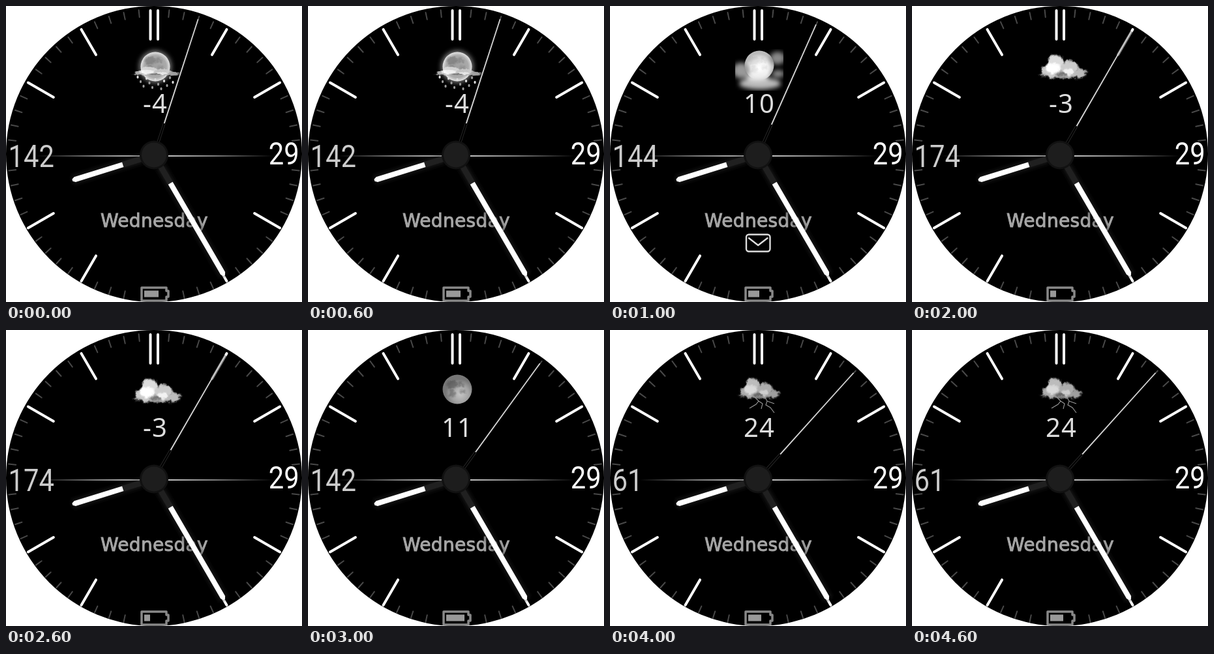
These frames come from a looping animation (454x454 px, 5000 ms). An HTML page:

```html
<!DOCTYPE html>
<html lang="en">
<head>
<meta charset="utf-8">
<title>Watch face</title>
<style>
  html, body { margin: 0; width: 100%; height: 100%; overflow: hidden; background: #fff; }
  svg { display: block; width: 100vw; height: 100vh; }
  .narrow { font: 48px Roboto, "Liberation Sans", sans-serif; transform: scaleX(.87); }
  .temp { font: 500 40px "Noto Sans", "Open Sans", sans-serif; letter-spacing: 1px; }
  .day { font: 28px "DejaVu Sans", sans-serif; letter-spacing: .3px; fill: #a6a6a6; stroke: #a6a6a6; stroke-width: 1; }
</style>
</head>
<body>
<svg viewBox="0 0 454 454">
  <defs>
    <linearGradient id="horizon" gradientUnits="userSpaceOnUse" x1="45" x2="410" y1="0" y2="0">
      <stop offset="0" stop-color="#fff" stop-opacity="0"/>
      <stop offset=".25" stop-color="#fff" stop-opacity=".5"/>
      <stop offset=".5" stop-color="#fff" stop-opacity=".85"/>
      <stop offset=".75" stop-color="#fff" stop-opacity=".5"/>
      <stop offset="1" stop-color="#fff" stop-opacity="0"/>
    </linearGradient>
    <radialGradient id="brightMoon" cx=".5" cy=".6">
      <stop offset="0" stop-color="#fff"/>
      <stop offset=".6" stop-color="#f0f0f0"/>
      <stop offset="1" stop-color="#bbb"/>
    </radialGradient>
    <radialGradient id="rimMoon">
      <stop offset="0" stop-color="#a0a0a0"/>
      <stop offset=".75" stop-color="#aaa"/>
      <stop offset="1" stop-color="#e4e4e4"/>
    </radialGradient>
    <radialGradient id="greyMoon" cx=".6" cy=".65">
      <stop offset="0" stop-color="#c8c8c8"/>
      <stop offset=".6" stop-color="#a2a2a2"/>
      <stop offset="1" stop-color="#777"/>
    </radialGradient>
    <filter id="soft" x="-50%" y="-50%" width="200%" height="200%"><feGaussianBlur stdDeviation="3.5"/></filter>
    <filter id="halo" filterUnits="userSpaceOnUse" x="-20" y="-235" width="40" height="235">
      <feGaussianBlur stdDeviation="3"/>
    </filter>
    <filter id="fluff" x="-20%" y="-20%" width="140%" height="140%">
      <feTurbulence type="fractalNoise" baseFrequency=".12" numOctaves="3" seed="4" result="noise"/>
      <feGaussianBlur in="SourceGraphic" stdDeviation="1"/>
      <feDisplacementMap in2="noise" scale="9" xChannelSelector="R" yChannelSelector="G"/>
    </filter>
    <clipPath id="sky"><rect x="192" y="66" width="74" height="64"/></clipPath>
    <clipPath id="dial"><circle cx="227" cy="227" r="227"/></clipPath>
  </defs>

  <g clip-path="url(#dial)">
    <rect width="454" height="454" fill="#000"/>
    <g id="marks" transform="translate(227 229)" stroke-linecap="round"></g>
    <rect x="45" y="229" width="365" height="2" fill="url(#horizon)"/>

    <g id="weather"></g>
    <text id="temp" class="temp" x="229" y="164" text-anchor="middle" fill="#ddd"></text>
    <text id="count" class="narrow" x="4" y="247" fill="#ccc"></text>
    <text class="narrow" x="463" y="243" fill="#fff">29</text>
    <text class="day" x="145" y="339">Wednesday</text>

    <g id="mail" fill="none" stroke="#ddd" stroke-width="2.4" stroke-linejoin="round" stroke-linecap="round">
      <rect x="209" y="350.5" width="36.5" height="26" rx="4"/>
      <path d="M213 356L227.2 367L241.5 356"/>
    </g>
    <path d="M208 432H246V437H249V446H246V452H208Z" fill="#000" stroke="#888" stroke-width="3.5" stroke-linejoin="round"/>
    <rect id="charge" x="212" y="436.5" height="10" fill="#999"/>

    <g transform="translate(227 228.5)">
      <g id="hands"></g>
      <g id="second">
        <path d="M0 0V-219" stroke="#000" stroke-opacity=".55" stroke-width="4.5"/>
        <path d="M-1.8 0L-1.5 -51M1.8 0L1.5 -51" stroke="#262626"/>
        <path d="M-1 -51H1L.9 -219H-.9Z" fill="#d4d4d4"/>
      </g>
      <circle r="22" fill="#111"/>
      <circle r="19" fill="#1d1d1d"/>
    </g>
  </g>
</svg>

<script>
const $ = id => document.getElementById(id);

const states = [
  { temp: '-4', count: 142, charge: 22, sky: 'sleet' },
  { temp: '10', count: 144, charge: 17, sky: 'mist', mail: true },
  { temp: '-3', count: 174, charge: 9, sky: 'cloud' },
  { temp: '11', count: 142, charge: 28, sky: 'moon' },
  { temp: '24', count: 61, charge: 20, sky: 'storm' }
];

const ellipse = (x, y, rx, ry, fill, extra = '') =>
  `<ellipse cx="${x}" cy="${y}" rx="${rx}" ry="${ry}" fill="${fill}" ${extra}/>`;
const moon = (fill, y = 91) => ellipse(229, y, 22.5, 22.5, `url(#${fill})`);
const soft = content => `<g filter="url(#soft)">${content}</g>`;
const craters = opacity => `<g filter="url(#fluff)" opacity="${opacity}">` +
  ellipse(221, 84, 8, 6, '#555') + ellipse(234, 82, 5, 4, '#666') +
  ellipse(221, 97, 5, 6, '#666') + ellipse(237, 94, 5, 3, '#777') + '</g>';
const cloud = (transform, opacity = 1) =>
  `<g transform="${transform}" opacity="${opacity}"><g filter="url(#fluff)">` +
  ellipse(230, 102, 36, 6, '#aaa') + ellipse(210, 96, 14, 10, '#ccc') +
  ellipse(218, 84, 12, 12, '#ddd') + ellipse(239, 92, 14, 11, '#ccc') +
  ellipse(254, 101, 12, 6, '#bbb') + ellipse(215, 92, 11, 8, '#fff') +
  ellipse(238, 98, 9, 5, '#f2f2f2') + ellipse(228, 102, 8, 3, '#777') + '</g></g>';

function drops() {
  let out = '';
  for (let i = 0; i < 13; i++) {
    out += ellipse(202 + i * 4.5, 109 + (i * 7) % 19, 1.6, 2.3, i % 3 ? '#999' : '#ddd');
  }
  return out;
}

const skies = {
  sleet: soft(ellipse(229, 93, 25, 25, '#777')) + moon('rimMoon', 93) + craters(.4) +
    cloud('translate(1 66) scale(1 .38)', .85) + drops(),
  mist: '<g clip-path="url(#sky)">' + moon('brightMoon') + craters(.12) +
    soft(ellipse(201, 99, 13, 12, '#999') + ellipse(230, 119, 32, 9, '#bbb') +
      ellipse(257, 80, 12, 10, '#888') + ellipse(258, 104, 10, 6, '#888') +
      ellipse(226, 109, 17, 5, '#eee')) + '</g>',
  cloud: cloud('translate(2 3)'),
  moon: moon('greyMoon') + craters(.65),
  storm: cloud('translate(29 11) scale(.87)', .85) +
    '<path d="M222 103L228 109L224 114L214 120M228 109L234 113L232 121M237 102L241 109L239 115L246 119L252 127M241 109L252 113" ' +
    'fill="none" stroke="#999" stroke-width="1.1"/>'
};

function drawMarks() {
  const line = (x, from, to, angle, color, width) =>
    `<path d="M${x} ${-from}V${-to}" stroke="${color}" stroke-width="${width}" transform="rotate(${angle})"/>`;
  let out = line(-5.5, 178, 222, 0, '#fff', 4) + line(6, 178, 222, 0, '#fff', 4);
  for (let i = 1; i < 60; i++) {
    if ([15, 29, 30, 31, 45].includes(i)) continue;
    out += i % 5 ? line(0, 213, 224, i * 6, '#484848', 2) : line(0, 178, 223, i * 6, '#fff', 4);
  }
  $('marks').innerHTML = out;
}

const hand = (angle, length) => `<g transform="rotate(${angle})">
  <path d="M0 -20V${-length}" stroke="#222" stroke-width="14" opacity=".65" filter="url(#halo)"/>
  <path d="M0 0V-50" stroke="#202020" stroke-width="9"/>
  <path d="M-4 -50H4V${4 - length}L1.5 ${-length}H-1.5L-4 ${4 - length}Z" fill="#fff"/></g>`;

$('hands').innerHTML = hand(252.8, 131) + hand(149.8, 214);
drawMarks();

let shown = -1;
function render(time) {
  const step = Math.floor(time / 1000) % states.length;
  if (step === shown) return;
  shown = step;
  const state = states[step];
  $('weather').innerHTML = skies[state.sky];
  $('temp').textContent = state.temp;
  $('count').textContent = state.count;
  $('charge').setAttribute('width', state.charge);
  $('mail').style.display = state.mail ? '' : 'none';
  $('second').setAttribute('transform', `rotate(${18 + step * 6})`);
}

const start = performance.now();
function tick() {
  render(performance.now() - start);
  requestAnimationFrame(tick);
}
tick();
</script>
</body>
</html>
```
